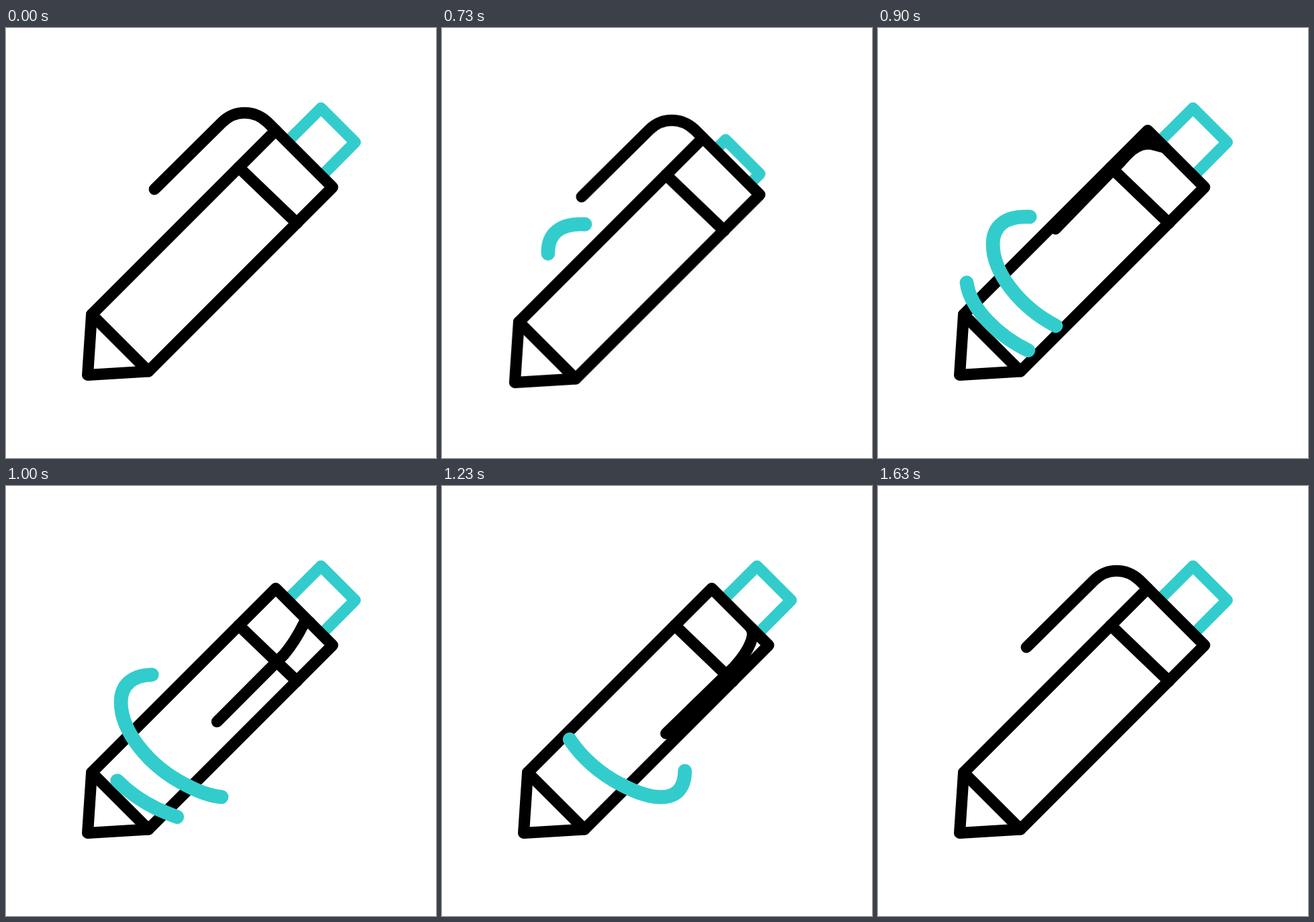
An HTML page for the animation above (2.5 s loop, 640 by 640 pixels).

```html
<!DOCTYPE html>
<html lang="en">
<head>
<meta charset="utf-8">
<title>Pen</title>
<style>
  @property --head { syntax: "<number>"; inherits: false; initial-value: 0; }
  @property --tail { syntax: "<number>"; inherits: false; initial-value: 0; }

  html, body { margin: 0; width: 100%; height: 100%; overflow: hidden; background: #fff; }
  svg { display: block; width: 100%; height: 100%; }
  path { fill: none; stroke: #000; stroke-width: 17; stroke-linecap: round; stroke-linejoin: round; }

  /* The picture advances 30 times a second: one step is 1.3333% of the loop. */
  .pen, .button, .clip, .swoosh {
    animation-duration: 2.5s;
    animation-delay: -2ms;
    animation-iteration-count: infinite;
    animation-timing-function: linear;
  }
  .pen { animation-name: recoil; }
  .body { fill: #fff; }
  .button { stroke: #33cccd; animation-name: press; }
  .clip { animation-name: flip; }
  .swoosh {
    stroke: #33cccd;
    stroke-width: 20.8;
    stroke-dasharray: calc((var(--head) - var(--tail)) * 1px) 300px;
    stroke-dashoffset: calc(var(--tail) * -1px);
    opacity: 0;
  }
  .long { animation-name: long-head, long-tail, long-show; }
  .short { animation-name: short-head, short-tail, short-show; }

  @keyframes recoil {
    0%, 25.2% { transform: none; animation-timing-function: steps(5); }
    31.867% { transform: translate(-21.9px, 18.5px); animation-timing-function: steps(3); }
    35.867%, 100% { transform: none; }
  }
  @keyframes press {
    0%, 23.867% { transform: none; animation-timing-function: steps(5); }
    30.533% { transform: translate(-42px, 45px); animation-timing-function: steps(3); }
    34.533%, 100% { transform: none; }
  }
  @keyframes flip {
    0%, 31.867% {
      d: path("M401.5 152.5L389.5 140.5C369.5 121.5 340.5 121.5 321.5 140.5L221 240");
      animation-timing-function: steps(3);
    }
    35.867% {
      d: path("M427 178L412 174C392 168 377 180 362 198L264 299");
      animation-timing-function: steps(7);
    }
    45.2% {
      d: path("M486 237L488 240C507 262 507 293 483 321L381 420");
      animation-timing-function: steps(8);
    }
    55.867% {
      d: path("M420 171L412 163C400 153 378 160 357 181L254 282");
      animation-timing-function: steps(2);
    }
    58.533%, 100% {
      d: path("M401.5 152.5L389.5 140.5C369.5 121.5 340.5 121.5 321.5 140.5L221 240");
    }
  }

  @keyframes long-head {
    0%, 25.2% { --head: 0; animation-timing-function: steps(3); }
    29.2% { --head: 21.8; animation-timing-function: steps(5); }
    35.867% { --head: 64; animation-timing-function: steps(3); }
    39.867% { --head: 80; animation-timing-function: steps(4); }
    45.2% { --head: 94; animation-timing-function: steps(5); }
    51.867%, 100% { --head: 100; }
  }
  @keyframes long-tail {
    0%, 37.2% { --tail: 0; animation-timing-function: steps(3); }
    41.2% { --tail: 3.5; animation-timing-function: steps(3); }
    45.2% { --tail: 12; animation-timing-function: steps(2); }
    47.867% { --tail: 27; animation-timing-function: steps(3); }
    51.867% { --tail: 57; animation-timing-function: steps(3); }
    55.867% { --tail: 84; animation-timing-function: steps(3); }
    59.867% { --tail: 95; animation-timing-function: steps(4); }
    65.2%, 100% { --tail: 100; }
  }
  @keyframes long-show {
    0% { opacity: 0; animation-timing-function: step-end; }
    26.533% { opacity: 1; animation-timing-function: step-end; }
    65.2%, 100% { opacity: 0; }
  }

  @keyframes short-head {
    0%, 29.2% { --head: 0; animation-timing-function: steps(5); }
    35.867% { --head: 76; animation-timing-function: steps(4); }
    41.2%, 100% { --head: 100; }
  }
  @keyframes short-tail {
    0%, 35.867% { --tail: 0; animation-timing-function: steps(4); }
    41.2% { --tail: 50; animation-timing-function: steps(3); }
    45.2%, 100% { --tail: 98.4; }
  }
  @keyframes short-show {
    0% { opacity: 0; animation-timing-function: step-end; }
    30.533% { opacity: 1; animation-timing-function: step-end; }
    46.533%, 100% { opacity: 0; }
  }
</style>
</head>
<body>
<svg viewBox="0 0 640 640">
  <g class="pen">
    <path class="button" d="M415 173L468.8 119.3L519.6 170L466 224"/>
    <path class="body" d="M127.5 426.5L401.5 152.5L486 237L212 511Z"/>
    <path d="M346.5 207.5L433 290.5M127.5 426.5L121.5 516.5L212 511"/>
    <path class="clip" d="M401.5 152.5L389.5 140.5C369.5 121.5 340.5 121.5 321.5 140.5L221 240"/>
    <path class="swoosh long" pathLength="100" d="M226 281C188 279 171 296 171 322C171 365 213 417 266 444C290 457 310 463 326 463C352 463 364 446 361 415"/>
    <path class="swoosh short" pathLength="100" d="M132 379C137 417 178 458 224 480C240 487 252 492 265 496"/>
  </g>
</svg>
</body>
</html>
```
